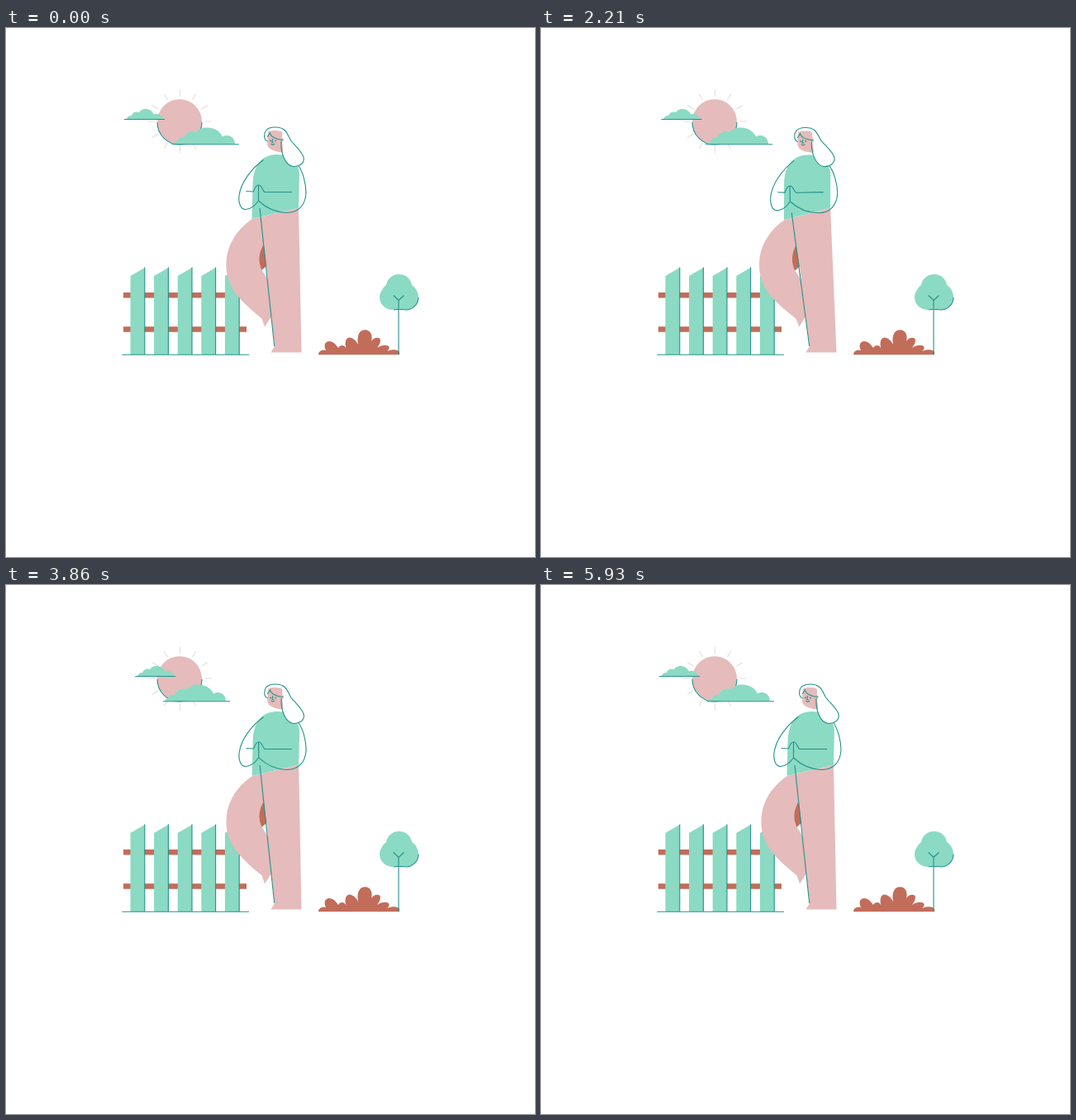
Write an HTML page that moves like this. It is 640x640 px and loops after 6000 ms.

```html
<!DOCTYPE html>
<html lang="en">
<head>
<meta charset="utf-8">
<title>Walk by the fence</title>
<style>
  html, body { margin: 0; width: 100%; height: 100%; overflow: hidden; background: #fff; }
  svg { display: block; width: 100%; height: 100%; }
  .mint { fill: #8bdac4; }
  .pink { fill: #e5bbbb; }
  .brown { fill: #c26c5a; }
  .white { fill: #fff; }
  .line { fill: none; stroke: #23928b; stroke-width: 1.1; }
  .ray { stroke: #e3dcdc; stroke-width: 1; }
  .nail { fill: #bcc4ba; }
</style>
</head>
<body>
<svg viewBox="0 0 640 640">
  <g id="rays"></g>
  <circle class="pink" cx="210" cy="113.3" r="27"/>
  <path class="line" d="M183 114A27 27 0 0 0 237 114"/>
  <g id="bigCloud">
    <path class="mint" d="M203 140.5C204 138 206 137 208 137C208 133 212 131.500 215 133.500C217 126.500 224 123.500 230 126C236 118 256 118 262 131.500C269 127.500 277 132 277 140.500Z"/>
    <path class="line" d="M201 140.800H282"/>
  </g>
  <g id="smallCloud">
    <path class="mint" d="M146 110C147 106.500 150 105.500 152 106C153 102 157 100.500 161 102C164 96.500 175 96 179 104.500C183 102.500 188 105 190 110Z"/>
    <path class="line" d="M143 110.500H192"/>
  </g>

  <path class="brown" d="M142 320H291V326.500H142ZM142 361.200H291V367.700H142Z"/>
  <g id="fence"></g>
  <path class="line" d="M140.500 395.300H294"/>

  <path class="brown" d="M378 395.300C378 391 382 389 387 390C384 384 386 379 391 379C396 379 399 383 402 387C404 383 410 383 411.500 388C409 379 412 374 416 374.500C421 375.500 424 379 426 383C424 371 428 365.200 434.500 365.200C441 365.200 444 372 442 379C445 374 450 374 452.500 376C454 380 451 384 449 387C455 383 462 383 463.500 386C464 388 463 389 461 391C468 388 475 389 476 392V395.300Z"/>
  <path class="mint" d="M475.500 298C484 298 490 304 491 311C497 315 499 321 499 326C499 335 491 341 484 341C480 341 477 340 475.500 339.500C473 341 469 341 467 341C459 340.500 452 334 452 326C452 321 455 315 460 311C461 304 467 298 475.500 298Z"/>
  <path class="line" d="M499 326C499 335 491 341 484 341C479 341 476 339 469 341M475 395V329.500M468.800 323.500L475 329.500L481.500 323.500"/>

  <g id="figure"></g>
</svg>
<script>
const LOOP = 6000;
const $ = id => document.getElementById(id);

function add(parent, tag, attrs) {
  const el = document.createElementNS('http://www.w3.org/2000/svg', tag);
  for (const name in attrs) el.setAttribute(name, attrs[name]);
  return parent.appendChild(el);
}

for (let i = 0; i < 12; i++) {
  add($('rays'), 'path', { class: 'ray', d: 'M30 0H38.500', transform: `translate(210.500 113) rotate(${i * 30})` });
}

for (let i = 0; i < 5; i++) {
  const picket = add($('fence'), 'g', { transform: `translate(${150.5 + i * 28.6} 0)` });
  add(picket, 'path', { class: 'mint', d: 'M0 395V300L17.300 290V395Z' });
  add(picket, 'path', { class: 'line', d: 'M17.300 289.500V395' });
  for (const y of [323.3, 364.5]) add(picket, 'circle', { class: 'nail', cx: 8.6, cy: y, r: 1.3 });
}

// Upright pose; every coordinate is written as an "x,y" pair so it can be bent.
const bodyParts = [
  ['pink', 'M298,231 L354,217.500 L357.500,392.500 L320.500,392.500 L325,385 L321,349 L313,361.500 L309.500,351.500 C298,342 281,328 274,315 C268,304 266,294 266.500,284 C267,262 280,243 298,231 Z'],
  ['brown', 'M311.500,262 C306,272 304.500,282 309.500,293 L315.200,288 Z'],
  ['white', 'M309.500,293 L315.200,288 L317,305 C314.500,301 312,296 309.500,293 Z'],
  ['mint', 'M297.500,231 L298.500,189 C299,168 308,153 328,153 C345,153 354,164 355,176 L354,217.500 Z'],
  ['white', 'M334,126 L340,127 C346,141 360,149 360,158 C360,165 353,168 347,167.500 C338,166 332,152 333,137 Z'],
  ['pink', 'M317,125.500 C321,123.500 329,123.500 333.800,125.500 L334.200,133 C336.500,134 336.500,137 334,138 L335.500,150.500 C326,150 317,147 316,141 Z'],
  ['line', 'M316.500,137 C311.500,135 311.500,128 314.500,124 C319,118.500 332,119 337,123.500 C341,127 342,132 344.500,136 C349,142 360,151 360.300,158 C360.300,165 353,168 347,167.500 C338,166 332,152 333,137'],
  ['line', 'M316,132 L319.500,127 C320,131 326,135 335,135.500'],
  ['line', 'M322.500,134 L322,138.500 L323.500,138.500 M320.500,140 C322,141.500 324,141 325,140'],
  ['line', 'M311.500,159.500 C297,170 284,187 282,203 C281,212 284,220 290,219.500 C296,219 302,214 305.500,209 L305.500,190'],
  ['line', 'M354,167 C359,174 363,188 363,200 C362,214 354,224 339,223.500 C325,223 313,216 305.500,209'],
  ['line', 'M290.500,197.500 L299.500,198 C301,194 302,190 305.500,190 C310,190 310,197 313,198.500 L346,198.500']
].map(([cls, shape]) => ({ shape, el: add($('figure'), 'path', { class: cls }) }));

const cane = add($('figure'), 'path', { class: 'line' });
const eyes = [320, 326].map(x => ({ x, el: add($('figure'), 'ellipse', { rx: 0.9, fill: '#23928b' }) }));

const clamp = (v, lo, hi) => Math.max(lo, Math.min(hi, v));
const swing = p => (1 - Math.cos(Math.PI * p)) / 2;

// Leaning bends the body sideways while the foot stays planted.
function bend(x, y, lean) {
  const height = (392.5 - y) / 262;
  return [x + lean * height, y + lean * (x - 350) / 262 * clamp(2 * height, 0, 1)];
}

function leanAt(t) {
  if (t < 700) return 0;
  if (t < 2400) return -6 * swing((t - 700) / 1700);
  if (t < 3860) return -6 + 6.2 * swing((t - 2400) / 1460);
  if (t < 5210) return 0.2 + 12.8 * ((t - 3860) / 1350) ** 1.7;
  return 13 * (1 - swing(clamp((t - 5210) / 720, 0, 1)));
}

// Cubic ease with control points (1/3, 0) and (1, 0.2).
function easeIn(p) {
  let lo = 0, hi = 1;
  for (let i = 0; i < 22; i++) {
    const s = (lo + hi) / 2, r = 1 - s;
    if (r * r * s + 3 * r * s * s + s ** 3 < p) lo = s; else hi = s;
  }
  return 0.6 * (1 - lo) * lo * lo + lo ** 3;
}

function driftAt(t) {
  const peak = 3870;
  return easeIn(t < peak ? t / peak : (LOOP - t) / (LOOP - peak));
}

function draw(now) {
  const t = now % LOOP, lean = leanAt(t), drift = driftAt(t);
  $('smallCloud').setAttribute('transform', `translate(${14.5 * drift} 0)`);
  $('bigCloud').setAttribute('transform', `translate(${-12 * drift} 0)`);

  for (const { shape, el } of bodyParts) {
    el.setAttribute('d', shape.replace(/([\d.]+),([\d.]+)/g, (_, x, y) => bend(+x, +y, lean).join()));
  }

  const top = bend(307, 218 + clamp(-lean, 0, 4.5), lean);
  const tip = [324.7 - clamp(lean / 8, 0, 0.9), 385 - clamp(1.3 * lean, 0, 9)];
  cane.setAttribute('d', `M${top}L${tip}`);

  const open = clamp(Math.abs(t - 160) / 140, 0.15, 1);
  for (const { x, el } of eyes) {
    const [cx, cy] = bend(x, 136.5, lean);
    el.setAttribute('cx', cx);
    el.setAttribute('cy', cy);
    el.setAttribute('ry', open);
  }
  requestAnimationFrame(draw);
}
draw(performance.now());
</script>
</body>
</html>
```
